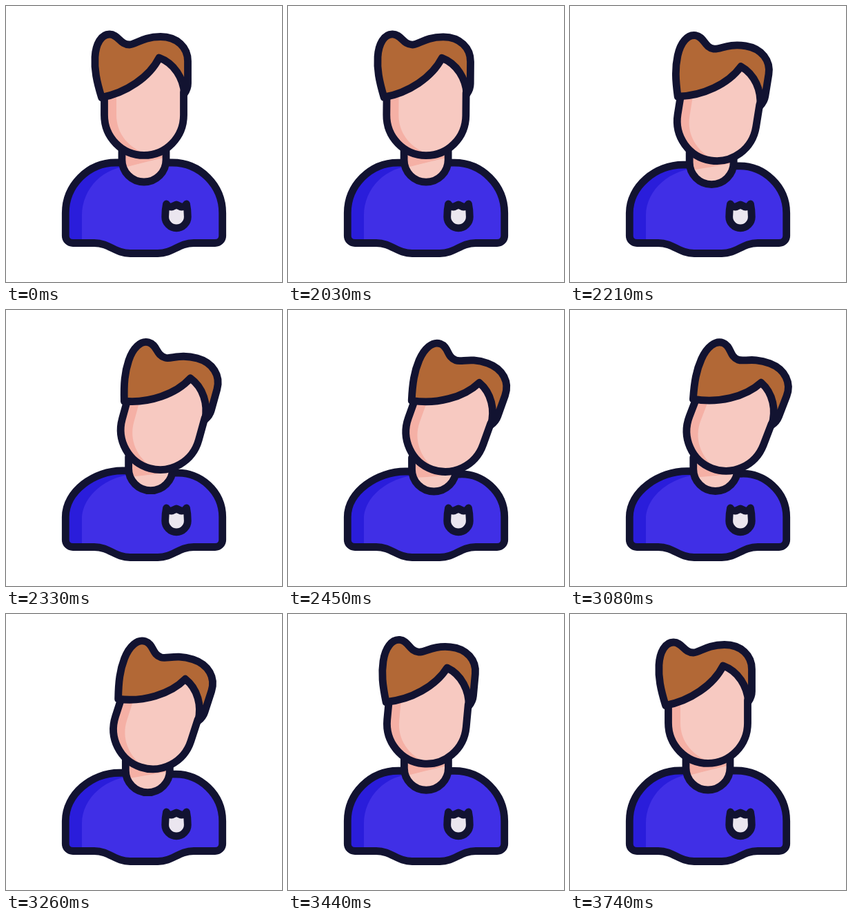
An HTML page that plays this animation: 400x400 px, repeating every 3770 ms.

```html
<!DOCTYPE html>
<html lang="en">
<head>
<meta charset="utf-8">
<title>Head tilt</title>
<style>
html, body { margin: 0; width: 100%; height: 100%; overflow: hidden; background: #fff }
svg { display: block; width: 100vw; height: 100vh }
.line { stroke: #121331; stroke-width: 10.8; stroke-linecap: round; stroke-linejoin: round }
</style>
</head>
<body>
<svg viewBox="0 0 400 400" fill="none">
  <path id="shirt" fill="#2a1ddb"/>
  <path id="shirtLight" fill="#402fe6"/>
  <path id="shirtLine" class="line"/>
  <g id="neck">
    <path d="M168 205V223A32 32 0 0 0 232 223V205Z" fill="#f7c9c1"/>
    <path id="neckShade" fill="#f5b0a5"/>
    <path class="line" d="M168 206V223A32 32 0 0 0 232 223V206"/>
  </g>
  <path class="line" fill="#ebe6ef" d="M232.5 287Q236 292 240.5 291L247 288L253.5 291Q258 292 261.5 287C262.8 293 263.3 298 263.3 305.5A16.3 16.3 0 0 1 230.7 305.5C230.7 298 231.2 293 232.5 287Z"/>
  <g id="head">
    <path fill="#f5b0a5" d="M142.5 130V158A57.5 58.5 0 0 0 257.5 158V95L222 72Z"/>
    <path fill="#f7c9c1" d="M160 118V158C160 184 177 207 208 216A57.5 58.5 0 0 0 257.5 158V95L222 72Z"/>
    <path class="line" d="M142.5 132V158A57.5 58.5 0 0 0 257.5 158V125"/>
    <path class="line" fill="#b26836" d="M138.5 132.5C131 108 128 92 129 74C130 55 138 41 150 41C163 41 165 56 179 56C188 56 198 44.5 224 44.5C248 44.5 263.5 60 263.5 80V112C263.5 118 262 122 258.5 127C257 105 244 83 222 75C208 103 174 126 138.5 132.5Z"/>
  </g>
</svg>
<script>
const LOOP = 3770;
const el = id => document.getElementById(id);
const set = (id, name, value) => el(id).setAttribute(name, value);

// Eased progress from 0 to 1 between two times; power < 1 starts faster
const ease = (t, from, to, power = 1) => {
  const u = Math.min(1, Math.max(0, (t - from) / (to - from)));
  return (1 - Math.cos(Math.PI * u ** power)) / 2;
};

function draw(t) {
  const lean = ease(t, 2000, 2450) - ease(t, 3000, 3500);
  // The tilt trails the lean and swings slightly past upright
  const tilt = 21 * ease(t, 2000, 2560, .8) - 23 * ease(t, 3150, 3620) + 2 * ease(t, 3620, 3750);

  set('head', 'transform', `translate(${28.5 * lean} ${18 * lean}) rotate(${tilt} 200 158)`);
  set('neck', 'transform', `translate(${11.5 * lean} ${8 * lean})`);
  set('neckShade', 'd', `M168 205H232V${219 + 10 * lean}Q210 ${224 + 9 * lean} 172 ${234 + lean}H168Z`);

  const shift = 11 * lean, left = 227 + 7 * lean, right = 227 + shift;
  const rest = `C313.7 ${260 + 3 * lean} 281 ${227 + 9 * lean} ${241 + 7 * lean} ${right}`;
  const hem = 'H128C150 343.5 158 358.5 180 358.5H220C242 358.5 250 343.5 272 343.5H303C309 343.5 313.7 339 313.7 333V300';
  const outline = `M${168 + shift} ${left}H${159 + shift}C${119 + shift} ${left} 86.3 ${260 + 3 * lean} 86.3 300V333C86.3 339 91 343.5 97 343.5${hem}${rest}H${232 + shift}`;
  set('shirt', 'd', outline);
  set('shirtLine', 'd', outline);
  set('shirtLight', 'd', `M110 343.5V304C110 ${264 + 3 * lean} ${142 + shift} ${left + 5} ${182 + shift} ${left + 5}L200 ${left}V${right}L110 343.5${hem}${rest}H200`);
}

function tick() {
  draw(performance.now() % LOOP);
  requestAnimationFrame(tick);
}
tick();
</script>
</body>
</html>
```
